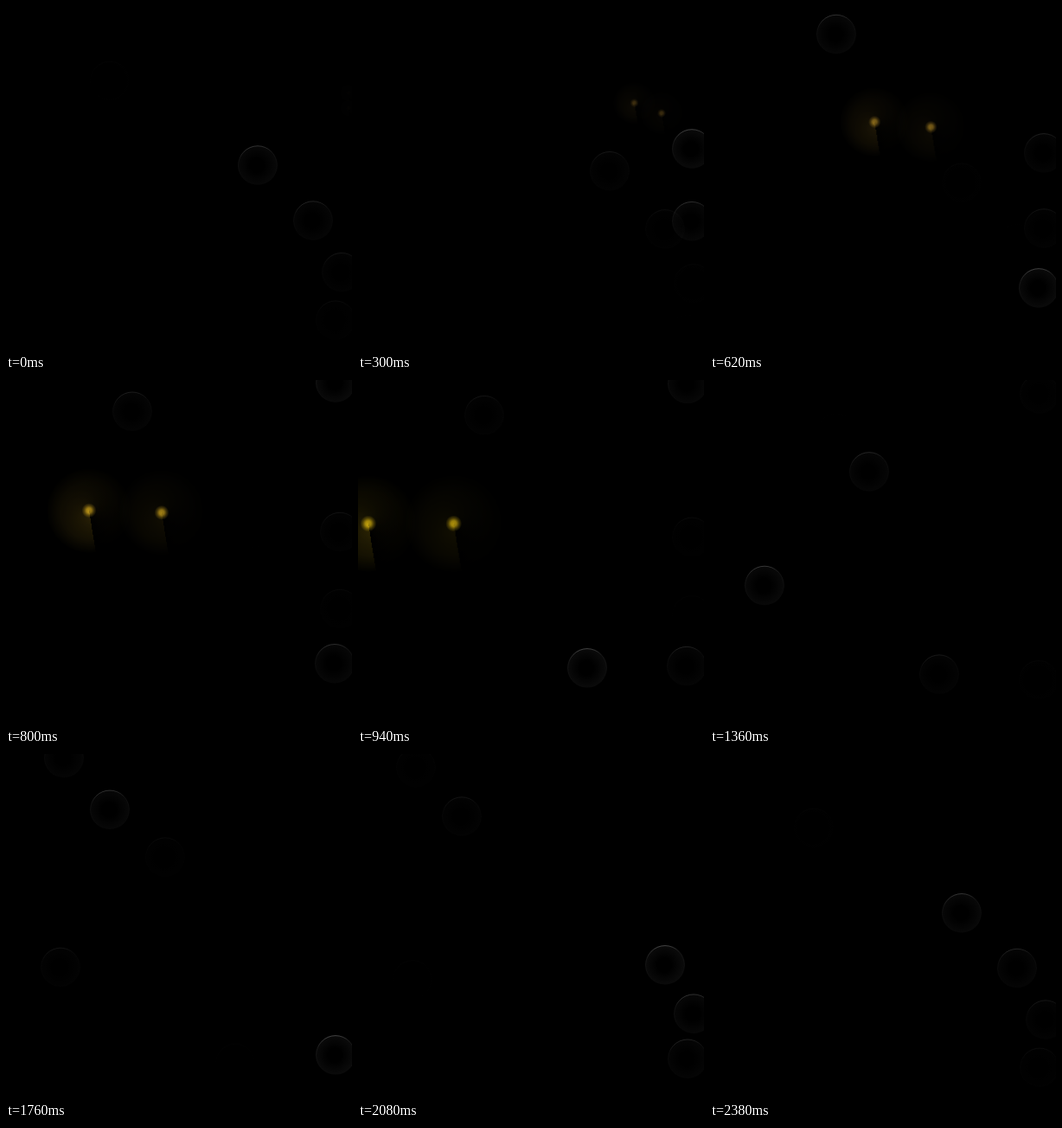
Animation of 400 by 400 pixels, one loop 2400 ms. Source, as an HTML page with a canvas:

```html
<!DOCTYPE html>
<html>
<head>
<meta charset="utf-8">
<style>
  html, body { margin: 0; width: 100%; height: 100%; overflow: hidden; background: #000; }
  canvas { display: block; }
</style>
</head>
<body>
<canvas id="stage" width="400" height="400"></canvas>
<script>
const LOOP = 2400;
const STEP = 20;
const TAU = Math.PI * 2;

// Bubbles appear one after another at a steady pace, sink and fade.
const RADIUS = 22.5;
const FIRST_BIRTH = 55;
const BIRTH_GAP = 165;
const LIFE = 1100;
const SINK = 3.2e-5;
const birthplaces = [
  [386, 247], [386, 165], [146, 31], [380, 326], [381, 3], [265, 333], [184, 103],
  [63, 237], [67, 0], [120, 63], [381, 348], [388, 299], [355, 244], [291, 183]
];

// Lights fly in from the right, speeding up as they come closer.
const PULL_X = -2.4e-4;
const PULL_Y = 4.88e-5;
const lights = [
  { y: 100.5, vx: -0.183, vy: 0.0238, power: 0.75 },
  { y: 118, vx: -0.078, vy: 0.0051, power: 0.33 }
];

const ctx = document.getElementById('stage').getContext('2d');
const layer = document.createElement('canvas');
layer.width = layer.height = 200;
const glow = layer.getContext('2d');

const white = a => `rgba(255,255,255,${a})`;

function blend(gradient, ...colors) {
  colors.forEach((color, i) => gradient.addColorStop(i / (colors.length - 1), color));
  return gradient;
}

function drawBubble([x, y], index, t) {
  const born = FIRST_BIRTH + index * BIRTH_GAP;
  const age = (t - born + LOOP) % LOOP;
  if (age >= LIFE) return;
  ctx.save();
  ctx.translate(x, y + SINK * age * age);
  ctx.globalAlpha = (1 - age / LIFE) ** 2;
  ctx.beginPath();
  ctx.arc(0, 0, RADIUS, 0, TAU);
  ctx.fillStyle = blend(ctx.createRadialGradient(-1, 0, 8, -1, 0, 24), white(0), white(0.05));
  ctx.fill();
  ctx.strokeStyle = blend(ctx.createLinearGradient(-4, -RADIUS, 4, RADIUS),
    white(0.28), white(0.08), white(0.05), white(0.02), white(0));
  ctx.lineWidth = 1;
  ctx.stroke();
  ctx.restore();
}

function drawLight({ y: top, vx, vy, power }, t) {
  const x = 396 + vx * t + PULL_X * t * t;
  const y = top + vy * t + PULL_Y * t * t;
  const reach = 9 + 0.05 * t;
  if (x < -reach) return;
  const warmth = Math.min(1, t / 940) ** 3;
  const tint = a => `hsla(${40 + 9 * warmth},${60 + 28 * warmth}%,39%,${a})`;
  const strength = Math.min(1, 0.02 + t / 800);

  // The glow sweeps clockwise from a sharp edge below the core.
  glow.globalCompositeOperation = 'source-over';
  glow.clearRect(0, 0, 200, 200);
  glow.fillStyle = blend(glow.createConicGradient(1.41, 100, 100),
    tint(0.34), tint(0.24), tint(0.16), tint(0.08), tint(0));
  glow.fillRect(0, 0, 200, 200);
  glow.globalCompositeOperation = 'destination-in';
  glow.fillStyle = blend(glow.createRadialGradient(100, 100, 0, 100, 100, reach),
    white(1), white(0.7), white(0.45), white(0));
  glow.fillRect(0, 0, 200, 200);

  ctx.save();
  ctx.globalCompositeOperation = 'lighter';
  ctx.globalAlpha = strength * power;
  ctx.drawImage(layer, x - 100, y - 100);

  const core = 3 + 0.0068 * t;
  ctx.globalAlpha = strength;
  ctx.fillStyle = blend(ctx.createRadialGradient(x, y, 0, x, y, core),
    tint(0.85), tint(0.75), tint(0.3), tint(0));
  ctx.fillRect(x - core, y - core, core * 2, core * 2);
  ctx.restore();
}

function render() {
  const t = Math.floor((performance.now() % LOOP) / STEP) * STEP;
  ctx.fillStyle = '#000';
  ctx.fillRect(0, 0, 400, 400);
  birthplaces.forEach((place, i) => drawBubble(place, i, t));
  lights.forEach(light => drawLight(light, t));
  requestAnimationFrame(render);
}
render();
</script>
</body>
</html>
```
